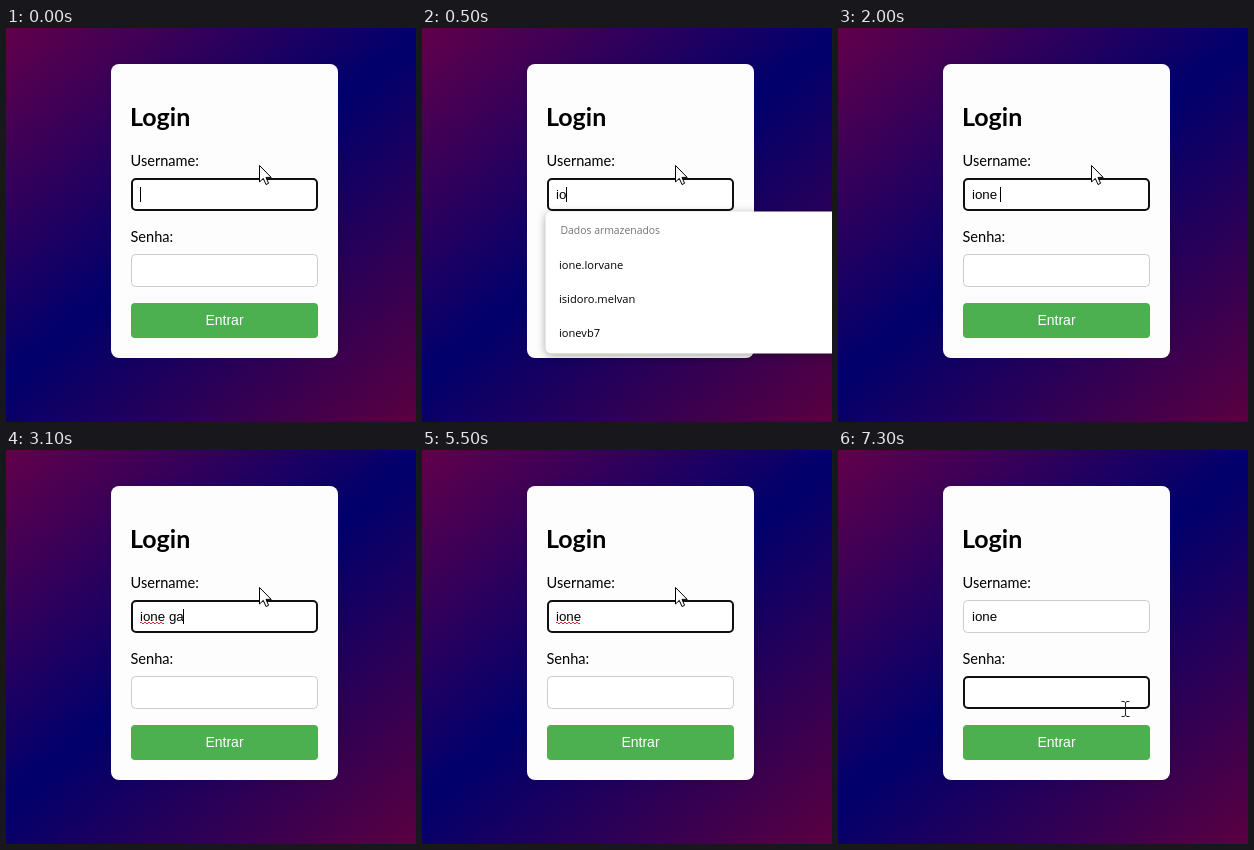
An HTML page that plays this animation: 410x394 px, repeating every 8000 ms.

```html
<!DOCTYPE html>
<html lang="pt-BR">
<head>
<meta charset="utf-8">
<title>Login</title>
<style>
  html, body { margin: 0; width: 100%; height: 100%; overflow: hidden; }
  body { background: linear-gradient(140deg, #62004a, #00006c 48%, #5a0040); }
  svg { display: block; width: 410px; height: 394px; }
  text { white-space: pre; }
  .label { font: 14.6px Lato, sans-serif; }
  .title { font: bold 25px Lato, sans-serif; }
  .field { font: 13.333px "Liberation Sans", Arial, sans-serif; }
  .button { font: 14px "Liberation Sans", Arial, sans-serif; fill: #fff; text-anchor: middle; }
  .item { font: 11.1px "Open Sans", sans-serif; }
  .hint { font: 10.4px "Open Sans", sans-serif; fill: #757575; }
  .box { fill: #fff; stroke: #ccc; }
  .box.focus { stroke: #101010; stroke-width: 2; }
  #card { filter: drop-shadow(0 0 5px rgba(0, 0, 0, .1)); }
  #panel { filter: drop-shadow(0 2px 4px rgba(0, 0, 0, .35)); }
</style>
</head>
<body>
<svg viewBox="0 0 410 394">
  <rect id="card" x="105" y="36" width="227" height="294" rx="8" fill="#fdfdfe"/>
  <text class="title" x="124" y="98">Login</text>
  <text class="label" x="124.5" y="138">Username:</text>
  <rect class="box" id="user"/>
  <text class="field" id="typed" x="134" y="171"></text>
  <path id="squiggle" fill="none" stroke="#e03030"/>
  <rect id="caret" y="159" width="1" height="15"/>
  <text class="label" x="124.5" y="214">Senha:</text>
  <rect class="box" id="password"/>
  <rect x="125" y="275" width="187" height="35" rx="4" fill="#4caf50"/>
  <text class="button" x="218.5" y="297">Entrar</text>

  <g id="dropdown">
    <rect id="panel" x="123.5" y="183.5" width="300" rx="6" fill="#fff"/>
    <text class="hint" x="138.5" y="206">Dados armazenados</text>
    <text class="item" x="137" y="241">ione.lorvane</text>
    <text class="item" id="second" x="137" y="275"></text>
    <text class="item" id="third" x="137" y="309">ionevb7</text>
  </g>

  <path id="arrow" d="M.5.5V17L4.3 13.4 7 19.5 9.6 18.4 7 12.4H12.2Z" fill="#fff" stroke="#000"/>
  <path id="beam" d="M-3.5-7.5H-1L.5-6.5 2-7.5H4.5M.5-6.5V6.5M-3.5 7.5H-1L.5 6.5 2 7.5H4.5" fill="none" stroke="#222"/>
</svg>
<script>
const $ = id => document.getElementById(id);
const show = (id, on) => $(id).setAttribute('visibility', on ? 'visible' : 'hidden');
const set = (id, attrs) => {
  for (const name in attrs) $(id).setAttribute(name, attrs[name]);
};

const LOOP = 8000, CLICK = 7200;

// [time, text, caret visible]
const typing = [
  [0, '', 1], [300, 'i', 1], [500, 'io', 1], [800, 'ion', 1], [1000, 'ione', 1], [1200, 'ione', 0],
  [2000, 'ione ', 1], [2200, 'ione ', 0], [3000, 'ione g', 1], [3100, 'ione ga', 1],
  [3400, 'ione gar', 1], [3500, 'ione garo', 1], [3700, 'ione garon', 1], [3800, 'ione garond', 1],
  [4000, 'ione garonde', 1], [4100, 'ione garond', 1], [4500, 'ione garon', 1],
  [5000, 'ione garo', 1], [5100, 'ione gar', 1], [5200, 'ione g', 1], [5400, 'ione ', 1],
  [5500, 'ione ', 0], [6100, 'ione', 0]
];

// [time, x, y] of the pointer's hot spot
const pointer = [
  [0, 253, 137], [6400, 254, 139], [6600, 264, 160], [6700, 285, 190], [6800, 306, 222],
  [6900, 314, 245], [7000, 313, 255], [7100, 303, 257], [7200, 293, 258], [7300, 287, 259]
];

const at = (steps, t) => steps.findLast(step => step[0] <= t);

function drawField(id, y, focused) {
  const inset = focused ? 1 : .5;
  $(id).classList.toggle('focus', focused);
  set(id, { x: 125 + inset, y: y + inset, width: 187 - 2 * inset, height: 33 - 2 * inset, rx: 4 });
}

function render(t) {
  const [, text, caretOn] = at(typing, t);
  const typed = $('typed');
  typed.textContent = text;
  set('caret', { x: Math.floor(134 + (text ? typed.getComputedTextLength() : 0)) });
  show('caret', caretOn);
  show('squiggle', t >= 2100 && t < CLICK);

  drawField('user', 150, t < CLICK);
  drawField('password', 226, t >= CLICK);

  const open = t >= 500 && t < 2000, filtered = t >= 1000;
  show('dropdown', open);
  set('panel', { height: filtered ? 108 : 142 });
  $('second').textContent = filtered ? 'ionevb7' : 'isidoro.melvan';
  show('third', open && !filtered);

  const [, x, y] = at(pointer, t);
  const overField = x >= 125 && x <= 312 && (y >= 150 && y <= 183 || y >= 226 && y <= 259);
  for (const id of ['arrow', 'beam']) set(id, { transform: `translate(${x} ${y})` });
  show('arrow', !overField);
  show('beam', overField);
}

set('squiggle', { d: 'M134 173q1-2 2 0' + 't2 0'.repeat(11) });

function tick() {
  render(performance.now() % LOOP);
  requestAnimationFrame(tick);
}
tick();
</script>
</body>
</html>
```
